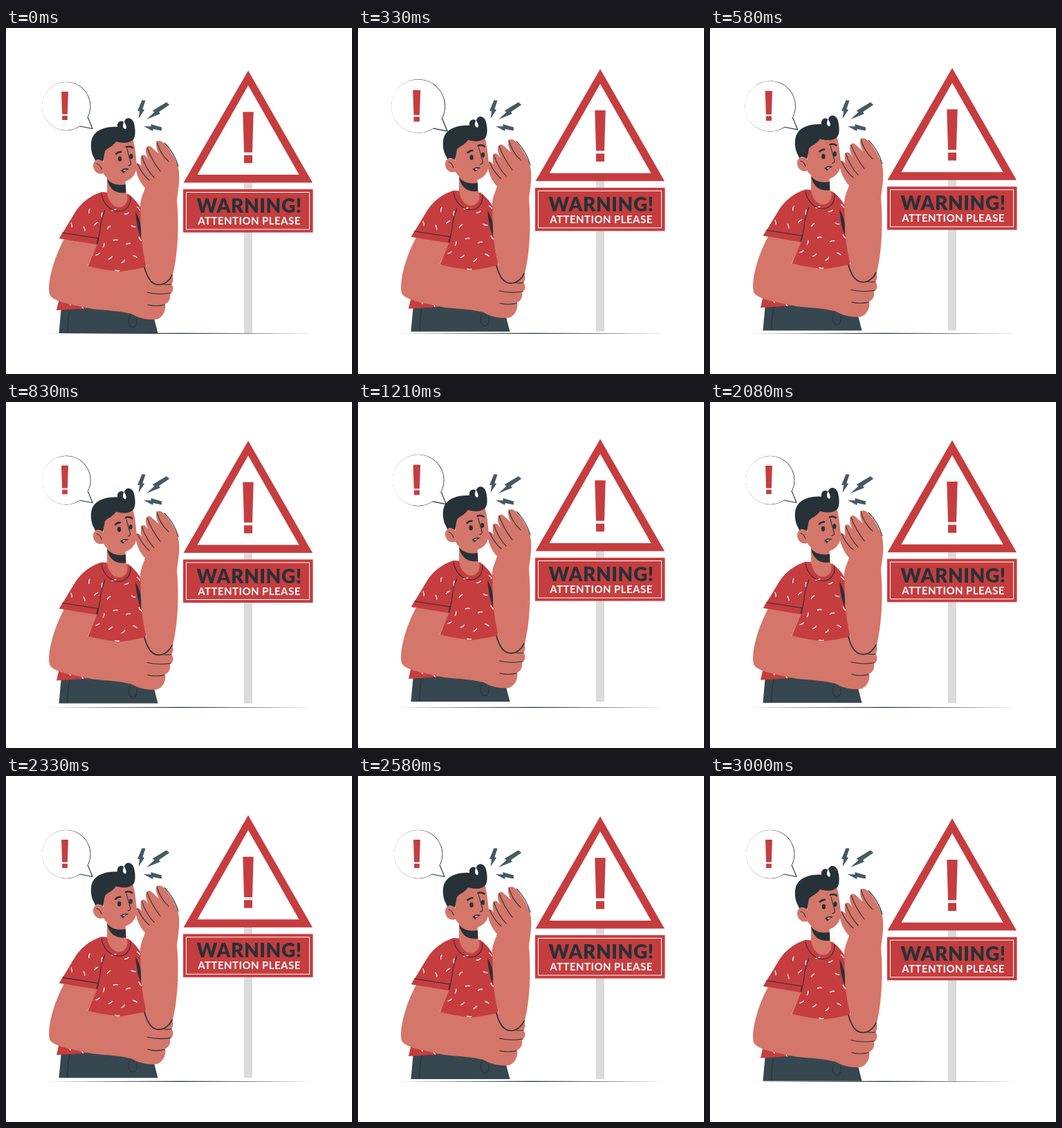
An HTML page for the animation above (3040 ms loop, 500x500 px).

```html
<!DOCTYPE html>
<html lang="en">
<head>
<meta charset="utf-8">
<title>Warning</title>
<style>
  html, body { margin: 0; width: 100%; height: 100%; overflow: hidden; background: #fff; }
  svg { display: block; width: 100vw; height: 100vh; }
  text { font-family: Lato, "Open Sans", sans-serif; text-anchor: middle; }
  .red { fill: #c63d3f; }
  .skin { fill: #d4766a; }
  .dark { fill: #263238; }
  .white { fill: #fff; }
  .line { fill: none; stroke: #263238; stroke-width: 1.1; stroke-linecap: round; stroke-linejoin: round; }
  .thick { stroke-width: 1.7; }
  .brow { stroke-width: 2.6; }
</style>
</head>
<body>
<svg viewBox="0 0 500 500">
  <defs>
    <path id="mark" class="red" d="M-7.7 -37H7.7L6 21.5H-6ZM-6 25.5H6V37H-6Z"/>
    <path id="bolt" fill="#455a64" d="M0 0L15 4V1L28 1L27 -4L10 -5L11 -2Z"/>
    <path id="shirt" d="M138 237C122 242 108 253 100 266L77 304L131 313L118 345V356H203L197 264Q190 250 177 240Z
      M78 386L73 408L118 405L112 388Z"/>
    <clipPath id="cloth"><use href="#shirt"/></clipPath>
  </defs>

  <g id="bubble">
    <circle class="dark" cx="87.2" cy="113" r="35.2"/>
    <circle class="white" cx="86.7" cy="113" r="34.9"/>
    <path class="white" d="M118 129L125 145.5L106 142Z"/>
    <path class="line" d="M118.5 129.5L125 145.5L107 142"/>
    <use href="#mark" transform="translate(85 112.5) scale(.64 .555)"/>
  </g>

  <use href="#bolt" transform="translate(191.5 131) rotate(-71)"/>
  <use href="#bolt" transform="translate(203 132) rotate(-34) scale(1.4 1.1)"/>
  <use href="#bolt" transform="translate(199 142) rotate(12) scale(.95 1)"/>

  <g id="sign">
    <path fill="#dbdbdb" d="M344 220H356V441H344Z"/>
    <path class="red" d="M350 61.5L443 223.500H256.500Z"/>
    <path class="white" d="M350 83L423.500 212H276.500Z"/>
    <use href="#mark" transform="translate(350 158.3)"/>
    <rect class="red" x="256" y="233" width="187.500" height="62.500"/>
    <rect x="260.500" y="237.500" width="178" height="53.500" fill="none" stroke="#fff"/>
    <text class="dark" x="351.500" y="267" font-size="28" font-weight="900" letter-spacing=".6">WARNING!</text>
    <text class="white" x="351.500" y="284" font-size="15" font-weight="700" letter-spacing=".45">ATTENTION PLEASE</text>
  </g>

  <g id="man">
    <g id="clothes">
      <path fill="#37474f" d="M80 402L76.500 441H219.500L212 412L150 398Z"/>
      <path class="line" d="M92 408Q89 422 89 440M179 416C174 428 181 436 187 431Q190 427 189 420"/>
      <use href="#shirt" class="red"/>
      <g id="dashes" clip-path="url(#cloth)" fill="none" stroke="#fff" stroke-width="1.3" stroke-linecap="round"></g>
      <path class="skin" d="M146 205V238C148 252 156 259 164 259C174 258 178 247 174 239L172 215Z"/>
      <path class="line" d="M138 240C141 256 152 264 162 265C173 265 181 257 180 243"/>
      <path class="line" d="M82 296L133 304M143 263Q136 281 136 292L132 312"/>
      <path class="dark" d="M187 265Q193 276 195 286V304Q189 290 187 265Z"/>
    </g>

    <g id="arms">
      <path class="skin" d="M84 305L132 312L118 344Q142 350 166 352Q186 349 204 345L240 357
        C243 363 241 368 239 370C243 375 242 382 237 384C238 391 236 396 230 399
        C232 408 226 419 218 421C205 422 193 420 181 413C165 409 145 408 125 406
        C98 400 67 396 63 385C59 368 70 330 84 305Z"/>
      <path class="red" d="M77 304L131 313L133 303L82 295Z"/>
      <path class="line" d="M82 296L133 304L131 312"/>
      <path class="skin" d="M203 345C196 320 194 290 194.500 263C192 250 198 241 201 231
        C194 224 188 212 187.500 201C187 194 193 195 196 200C193 189 195 181 201 184
        L206 190C199 177 202 168 209 171L221 182C215 170 216 163 222 163
        C229 163 242 184 247 196C254 214 248 236 247 250C250 280 249 325 241 357C235 373 212 378 203 345Z"/>
      <path class="line" d="M190 196Q197 212 207 220M196 185Q203 205 214 216M204 173Q211 192 223 207
        M218 164Q222 181 235 193M229 166Q243 180 249 200"/>
      <path class="line thick" d="M200 346C205 363 211 371 221 371C230 371 237 364 240 357"/>
      <path class="line" d="M204 382Q220 386 238 383M239 370Q233 372 228 370M205 400Q217 403 229 400"/>
    </g>

    <g id="head">
      <path class="skin" d="M141 194L137 172L150 160H183C187 173 187 181 189 196
        C190 213 178 224 162 223C149 221 143 215 141 210C132 213 126 206 126 199
        C126 190 135 188 141 194Z"/>
      <path class="dark" d="M146 218C153 226 162 228 173 226V238C159 240 149 233 146 218Z"/>
      <path class="dark" d="M128 189C122 180 121 164 126 156C132 146 147 142 161 143
        C160 136 165 132 171 136C172 129 180 128 184 135C187 143 188 156 184 161
        C177 168 166 166 159 164C154 172 146 173 143 178L140 193C136 190 132 189 129 192Z"/>
      <path class="white" d="M170 136C168 142 169 146 173 146C175 144 173 139 171 136Z"/>
      <path class="line" d="M131 196Q136 197 138 204"/>
    </g>
    <g id="face">
      <ellipse class="dark" cx="164.500" cy="189" rx="2.700" ry="3.800"/>
      <ellipse class="dark" cx="181" cy="185.500" rx="2.500" ry="3.700"/>
      <path class="line brow" d="M159 182Q162 179 166 179M174 172Q179 170 183 173"/>
      <path class="line" d="M175 175L180.500 195Q181 198 177 199"/>
      <path class="dark" d="M166 206Q171 201 178 204L173 206L170 210Z"/>
      <path class="white" d="M169 205.500L174 204.500L171 207Z"/>
    </g>
  </g>

  <path class="dark" d="M55 441.3L250 440.700L445 441.300L250 442Z"/>
</svg>
<script>
const LOOP = 3040, RISE = 10, DASHES = 44;
const get = id => document.getElementById(id);
const move = (id, value) => get(id).setAttribute("transform", value);

// Evenly scattered dashes, cut to the cloth
get("dashes").innerHTML = Array.from({ length: DASHES }, (_, i) => {
  const x = 75 + 125 * (i * 0.7549 % 1);
  const y = 248 + 157 * (i * 0.5698 % 1);
  return `<path d="M-3 0Q0 -1 3 0" transform="translate(${x} ${y}) rotate(${i * 137.5})"/>`;
}).join("");

// Smooth bump of the given size around a peak time
function pulse(t, peak, half, size) {
  const d = Math.min(1, Math.abs(t - peak) / half);
  return size * (1 + Math.cos(Math.PI * d)) / 2;
}

function draw(now) {
  const t = now % LOOP;
  const p = 1 - Math.abs(1 - 2 * t / LOOP);
  const scale = 1 + pulse(t, 370, 370, 0.11) + pulse(t, 1400, 700, 0.075);
  const lift = `translate(0 ${-RISE * p})`;
  move("sign", lift);
  move("man", lift);
  move("face", `translate(${-1.7 * p} ${p})`);
  move("bubble", `translate(87 112.5) scale(${scale}) translate(-87 -112.5)`);
}

const start = performance.now();
function tick() {
  draw(performance.now() - start);
  requestAnimationFrame(tick);
}
tick();
</script>
</body>
</html>
```
